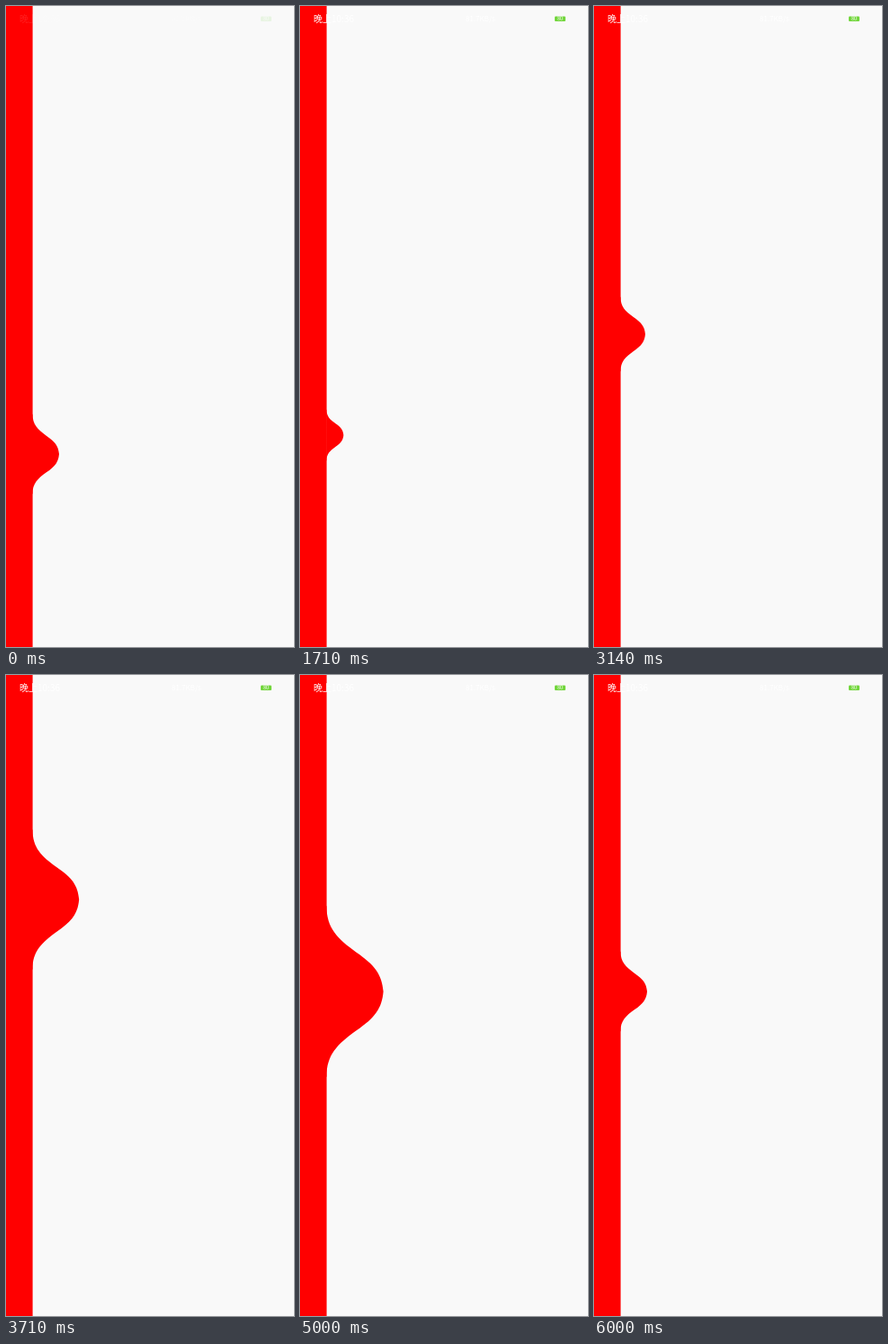
These frames come from a looping animation (320 px wide and 711 px high, 6.14 s). An HTML page:

```html
<!DOCTYPE html>
<html lang="zh">
<head>
<meta charset="utf-8">
<title>Elastic edge</title>
<style>
  html, body { margin: 0; height: 100%; overflow: hidden; background: #f9f9f9; }
  svg { display: block; width: 100%; height: 100%; }
  text { font-family: "Noto Sans CJK SC", "Noto Sans CJK", "Noto Sans", sans-serif; fill: #fff; }
  #status { animation: appear 6140ms step-end infinite; }
  @keyframes appear { 0% { opacity: .12; } 7% { opacity: 1; } }
</style>
</head>
<body>
<svg viewBox="0 0 320 711">
  <rect width="320" height="711" fill="#f9f9f9"/>
  <rect width="29.6" height="711" fill="#f00"/>
  <!-- Unit bump: one wide, three high, tip at (1, 0) -->
  <path id="bump" fill="#f00" d="M-.02-1.5H0C0-1.11 .19-.93 .52-.69C.85-.465 .975-.3 1 0
    C.975 .3 .85 .465 .52 .69C.19 .93 0 1.11 0 1.5H-.02Z"/>
  <g id="status">
    <text x="15" y="18" font-size="10">晚上10:36</text>
    <text x="184" y="17" font-size="8">81.7KB/s</text>
    <rect x="283" y="11.5" width="12" height="5.5" rx="1" fill="#72d63c"/>
    <text x="286" y="16.3" font-size="5.5">80</text>
  </g>
</svg>
<script>
  const LOOP = 6140, FPS = 7, EDGE = 29.5, REST = 29.5, SPRING = 700, TENSION = 3;
  const bump = document.getElementById('bump');

  // Each drag: touch time, time of full pull, release time, pulled width, centre, centre on release
  const drags = [
    { touch: 360, full: 1000, release: 1110, width: 85.5, y: 476, endY: 476 },
    { touch: 2060, full: 2280, release: 2513, width: 108, y: 380, endY: 364 },
    { touch: 3500, full: 3850, release: 3996, width: 90, y: 249, endY: 249 },
    { touch: 4930, full: 5140, release: 5219, width: 90, y: 351, endY: 351 }
  ];

  const clamp = v => Math.min(1, Math.max(0, v));
  const easeOut = p => 1 - (1 - p) ** 2;

  // Remaining share of the pull while it snaps back past its rest width
  function overshoot(p) {
    const left = 1 - p;
    return left * left * ((TENSION + 1) * left - TENSION);
  }

  function pose(time) {
    const drag = drags.filter(d => d.touch <= time).pop();
    if (!drag) return { width: REST, y: 497 };
    const released = time >= drag.release;
    const pull = released
      ? overshoot(clamp((time - drag.release) / SPRING))
      : easeOut(clamp((time - drag.touch) / (drag.full - drag.touch)));
    return {
      width: REST + (drag.width - REST) * pull,
      y: released ? drag.endY : drag.y
    };
  }

  const start = performance.now();
  function draw() {
    const elapsed = (performance.now() - start) % LOOP;
    const time = Math.floor((elapsed + 3) * FPS / 1000) * 1000 / FPS;
    const { width, y } = pose(time);
    bump.setAttribute('transform', `translate(${EDGE} ${y}) scale(${width})`);
    requestAnimationFrame(draw);
  }
  draw();
</script>
</body>
</html>
```
